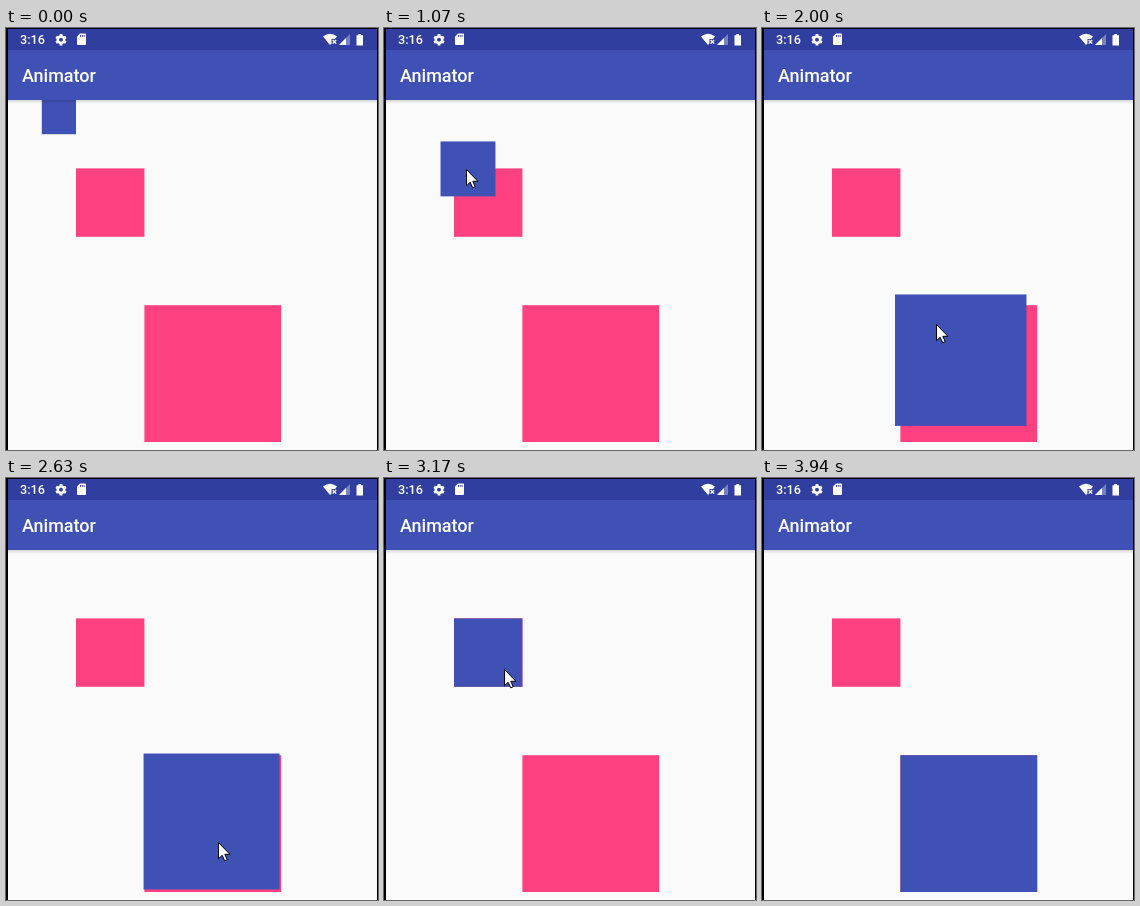
An HTML page for the animation above (4.65 s loop, 372x422 px).

```html
<!DOCTYPE html>
<html lang="en">
<head>
<meta charset="utf-8">
<title>Animator</title>
<style>
  html, body { margin: 0; width: 100%; height: 100%; overflow: hidden; background: #fafafa; }
  svg { display: block; }
  text { font-family: Roboto, sans-serif; font-weight: 500; fill: #fff; }
</style>
</head>
<body>
<svg width="372" height="422" viewBox="0 0 372 422">
  <defs>
    <linearGradient id="shade" x2="0" y2="1">
      <stop stop-color="#000" stop-opacity=".14"/>
      <stop offset="1" stop-color="#000" stop-opacity="0"/>
    </linearGradient>
  </defs>
  <rect width="372" height="422" fill="#fafafa"/>
  <rect class="square" fill="#ff4081"/>
  <rect class="square" fill="#ff4081"/>
  <rect class="square" fill="#3f51b5"/>

  <!-- app bar and status bar -->
  <rect y="72" width="372" height="4" fill="url(#shade)"/>
  <rect y="22" width="372" height="50" fill="#3f51b5"/>
  <rect width="372" height="22" fill="#303f9f"/>
  <text x="16" y="54" font-size="18">Animator</text>
  <text x="14" y="16" font-size="12.7">3:16</text>
  <g fill="#fff">
    <g transform="translate(55 11.7)" stroke="#fff">
      <circle r="3.2" fill="none" stroke-width="2.6"/>
      <path d="M0-5.7V-4M0 4V5.7M-4.9-2.8L-3.5-2M3.5 2L4.9 2.8M-4.9 2.8L-3.5 2M3.5-2L4.9-2.8" stroke-width="2.8"/>
    </g>
    <path d="M74 5.5H79Q80 5.5 80 6.5V16Q80 17 79 17H72Q71 17 71 16V8.5Z"/>
    <path d="M74.5 7V9M76.3 7V9M78.1 7V9" stroke="#303f9f" stroke-width=".9"/>
    <path d="M317 8.4Q324 3 331 8.4L329 11H325.5V15.5L324 17Z"/>
    <path d="M326.6 12L330.2 15.6M330.2 12L326.6 15.6" stroke="#fff" stroke-width="1.3"/>
    <path d="M344 6V17H333Z" opacity=".35"/>
    <path d="M340 10V17H333Z"/>
    <path d="M352.3 6H355V7.2H357V17.5H350.5V7.2H352.3Z"/>
  </g>
  <path d="M0 0H372V422H371V1H2V422H0Z"/>

  <path id="cursor" d="M0 0V16.2L3.7 12.8 6.2 18.3 8.7 17.2 6.3 11.8H11.4Z" fill="#fff" stroke="#000"/>
</svg>
<script>
const LOOP = 4650, STEP = 76.8;
const SMALL = 34.2, MEDIUM = SMALL * 2, LARGE = SMALL * 4;
const [medium, large, box] = document.querySelectorAll('.square');
const cursor = document.getElementById('cursor');

// Moves: [start ms, end ms, ...values reached]
const growth = [
  [760, 1300, MEDIUM],
  [1777, 2055, LARGE],
  [2600, 3010, MEDIUM],
  [3400, 3820, LARGE]
];
const gestures = [
  [70, 530, 66, 103],
  [881, 1400, 121, 231],
  [1400, 1530, 112, 177],
  [1777, 2150, 204, 354],
  [2161, 2312, 212, 364],
  [2627, 3010, 118, 182],
  [3010, 3164, 120, 191],
  [3164, 3548, 138, 229],
  [3548, 3900, 359, 400]
];

function ease(p) {
  p = Math.min(1, Math.max(0, p));
  return p * p * (3 - 2 * p);
}

function follow(moves, from, t) {
  return moves.reduce((pose, [start, end, ...goal]) => {
    const p = ease((t - start) / (end - start));
    return pose.map((v, i) => v + (goal[i] - v) * p);
  }, from);
}

// Position follows from the side alone.
function place(rect, side) {
  const attrs = { x: side + 1.6, y: 2 * side + 3.6, width: side, height: side };
  for (const name in attrs) rect.setAttribute(name, attrs[name]);
}

// The picture advances in steps, restarting after each pause.
function held(t) {
  const start = t >= 2550 ? 2550 : t >= 1700 ? 1700 : 70;
  return start + Math.floor((t - start) / STEP + .12) * STEP;
}

function draw() {
  const t = performance.now() % LOOP, h = held(t);
  place(box, follow(growth, [SMALL], h)[0]);
  const [x, y] = follow(gestures, [240, 370], h).map(Math.round);
  cursor.setAttribute('transform', `translate(${x + .5} ${y + .5})`);
  cursor.style.display = t >= 70 && t < 3940 ? '' : 'none';
  requestAnimationFrame(draw);
}

place(medium, MEDIUM);
place(large, LARGE);
draw();
</script>
</body>
</html>
```
